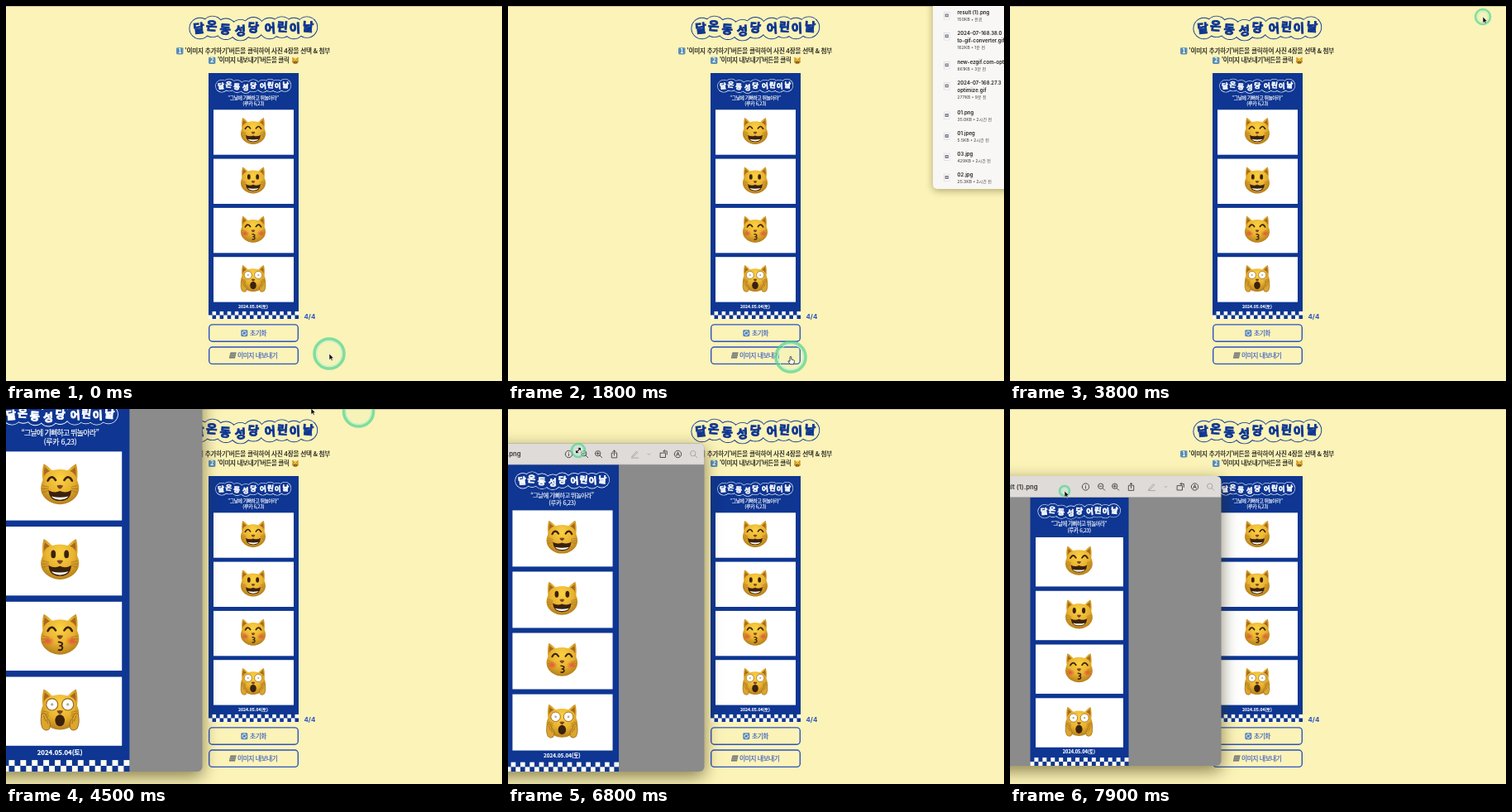
These frames come from a looping animation (600x453 px, 8000 ms). An HTML page:

```html
<!DOCTYPE html>
<html lang="ko">
<head>
<meta charset="utf-8">
<title>네컷 사진 만들기</title>
<style>
  html, body { margin: 0; width: 100%; height: 100%; overflow: hidden; background: #fbf3b8; }
  svg { display: block; width: 600px; height: 453px; }
  text { font-family: "Noto Sans CJK KR", "Noto Sans CJK", "Noto Sans", sans-serif; white-space: pre; }
  .ui { font-family: Inter, "Noto Sans CJK KR", "Noto Sans CJK", sans-serif; }
  .line { fill: none; stroke-linecap: round; stroke-linejoin: round; }
  #panel { filter: drop-shadow(0 2px 5px rgba(60, 50, 0, .4)); }
  #frame { filter: drop-shadow(0 6px 10px rgba(50, 40, 0, .58)); }
</style>
</head>
<body>
<svg id="stage" viewBox="0 0 600 453" xmlns="http://www.w3.org/2000/svg"></svg>
<script>
const CREAM = '#fbf3b8', NAVY = '#0e3692', BLUE = '#2c52c2';
const LOOP = 8000, STEP = 100;

// y is the visual middle of the line; bold is an extra outline in the text colour
const text = (x, y, s, size, o = {}) =>
  `<text x="${x}" y="${y + size * .36}" font-size="${size}" font-weight="${o.w || 500}"
    fill="${o.fill || '#111'}" stroke="${o.fill || '#111'}" stroke-width="${o.bold || 0}"
    text-anchor="${o.a || 'start'}" letter-spacing="${o.ls || 0}" class="${o.c || ''}">${s}</text>`;
const rect = (x, y, w, h, fill, more = '') =>
  `<rect x="${x}" y="${y}" width="${w}" height="${h}" fill="${fill}" ${more}/>`;
const line = (d, color, width = 1) =>
  `<path class="line" d="${d}" stroke="${color}" stroke-width="${width}"/>`;
const at = (x, y, s, inner) => `<g transform="translate(${x} ${y}) scale(${s})">${inner}</g>`;
const mirror = s => s + `<g transform="scale(-1 1)">${s}</g>`;

// Scalloped badge title, centred on 0,0
function logo(fill, ink) {
  const letters = [...'달온동성당어린이날'];
  const xs = [-66, -50.5, -34, -16, 0, 20, 35, 50, 66];
  const ys = [0, -3, 1, 3, -1, 0, -2, 0, -2];
  const turn = [-5, 4, 3, -3, 4, -4, 5, -3, 5];
  const disc = (r, color) => xs.map((x, i) =>
    `<circle cx="${x * .98}" cy="${ys[i] * .7}" r="${r}" fill="${color}"/>`).join('');
  return disc(13.2, ink) + disc(12.3, fill) + letters.map((c, i) =>
    `<g transform="translate(${xs[i]} ${ys[i]}) rotate(${turn[i]})">
      ${text(0, 0, c, 14.5, { w: 900, fill: ink, a: 'middle', bold: .9 })}</g>`).join('');
}

// Cat faces, about 31 units wide
const HEAD = 'M-12.8-16C-10.5-15-8-12.5-6.2-10.8Q0-12.8 6.2-10.8C8-12.5 10.5-15 12.8-16' +
  'C14-12 14.2-8 13.6-3C15.4 1 15.6 4.5 14 8C11 13.5 5 16 0 16' +
  'C-5 16-11 13.5-14 8C-15.6 4.5-15.4 1-13.6-3C-14.2-8-14-12-12.8-16Z';
const BROWN = '#3a210c';
const GRIN = `<path d="M-9 4.8Q-4.5 7.4 0 5.4Q4.5 7.4 9 4.8Q8.4 13.2 0 13.2Q-8.4 13.2-9 4.8Z" fill="${BROWN}"/>
  <path d="M-6.8 9.6Q0 11.2 6.8 9.6Q4.6 12.2 0 12.3Q-4.6 12.2-6.8 9.6Z" fill="#fff"/>`;
const ARCH = mirror(line('M3.4-3.2Q6.6-8.2 9.6-2.8', BROWN, 1.7));
const FACES = [
  ARCH + GRIN,
  mirror(`<ellipse cx="5.2" cy="-4" rx="1.9" ry="3.2" fill="${BROWN}"/>`) + GRIN,
  mirror(`<ellipse cx="9.4" cy="5.2" rx="5" ry="3.8" fill="url(#blush)"/>`) + ARCH +
    line('M-1 6Q3 6.4 1.6 8.3Q.6 9 0 9Q3 9.4 1.6 11.8Q.6 12.6-1 12.2', BROWN, 1.3),
  mirror(`<circle cx="6.2" cy="-4" r="4.6" fill="#fff" stroke="#94631c" stroke-width=".7"/>
    <circle cx="6.2" cy="-4" r="1.1" fill="#b9a98c"/>`) +
    `<ellipse cx="0" cy="8.6" rx="3.8" ry="4.6" fill="${BROWN}"/>` +
    mirror(`<path d="M14.6 4C12.6 1.5 11 4 10 7C8 9 7 12 8.5 15.5Q11 17.4 13.6 15Q15.8 11 14.6 4Z"
      fill="#dca52c" stroke="#94631c" stroke-width=".6"/>` + line('M12.8 5L11.4 9M10.4 8L9.6 11', '#a06c1a', .6))
];
const cat = i => `<path d="${HEAD}" fill="url(#fur)"/>` +
  mirror(`<path d="M12-13.4L8-10.4Q11.5-9 12.6-6Q13-10 12-13.4Z" fill="#a8691c"/>`) +
  mirror(line('M9 2.2L13.6 1.2M9.2 3.6H14M9 5L13.4 6.2', '#94631c', .4)) +
  FACES[i] +
  `<path d="M-2.4 1Q0 .2 2.4 1Q1.7 3.4 0 3.7Q-1.7 3.4-2.4 1Z" fill="#7d4526"/>`;

// Photo strip, 109 x 297
function strip() {
  const cell = 109 / 24;
  let s = rect(0, 0, 109, 297, NAVY) + at(54.2, 15.7, .59, logo(NAVY, '#fff')) +
    text(54, 29.8, '“그날에 기뻐하고 뛰놀아라”', 5.9, { fill: '#fff', a: 'middle', ls: -.5, bold: .12 }) +
    text(54.2, 37, '(루카 6,23)', 5.9, { fill: '#fff', a: 'middle', ls: -.2, bold: .12 });
  for (let i = 0; i < 4; i++) {
    const y = 44.3 + i * 59.3;
    s += rect(6, y, 97, 54.4, '#fff') + at(54, y + 25.8, 1, cat(i));
  }
  s += text(54, 281.8, '2024.05.04(토)', 5.1, { w: 700, fill: '#fff', a: 'middle', bold: .12 });
  for (let i = 0; i < 24; i++)
    s += rect(i * cell, 297 - cell * (i % 2 ? 2 : 1), cell, cell, '#fffef0');
  return s;
}

const keycap = (x, y, n) => rect(x, y - 4, 8.4, 8.2, '#5b8fb4', 'rx="1.4"') +
  text(x + 4.2, y, n, 7, { w: 700, fill: '#fff', a: 'middle' });
const button = (y, x, label) =>
  rect(245.7, y, 107.6, 20.4, CREAM, `rx="4" stroke="${BLUE}" stroke-width="1.4"`) +
  text(x, y + 10.2, label, 7.8, { fill: BLUE, ls: -.5, bold: .1 });

function page() {
  return rect(0, 0, 600, 453, CREAM) + rect(0, 0, 600, 1, '#cfc79c') +
    at(299.3, 27, 1, logo(CREAM, NAVY)) +
    keycap(206, 54.2, 1) +
    text(216.5, 54, "'이미지 추가하기'버튼을 클릭하여 사진 4장을 선택 &amp; 첨부", 7.6, { ls: -.2, bold: .18 }) +
    keycap(245, 65.8, 2) +
    text(256, 65.6, "'이미지 내보내기'버튼을 클릭", 7.6, { ls: -.36, bold: .18 }) +
    at(350, 65.8, .26, cat(0)) +
    '<use href="#strip" x="245" y="81"/>' +
    text(360.5, 375, '4/4', 7.9, { w: 700, fill: BLUE, c: 'ui' }) +
    button(384.9, 295, '초기화') + button(412, 280, '이미지 내보내기') +
    rect(284.3, 391.2, 8, 8, '#5b87b8', 'rx="1.4"') +
    line('M286 395.2A2.3 2.3 0 0 1 290 393.6M290.6 395.2A2.3 2.3 0 0 1 286.6 396.8', '#fff', 1) +
    `<path d="M271.5 418.4H278.6L277 425.6H269.8Z" fill="#5d6268"/>` +
    line('M271.8 420.2H277.6M271.2 422H277.2M270.8 423.8H276.8', '#d9d4b0', .7);
}

// Download list: first line's middle, name lines, details
const FILES = [
  [8, ['result (1).png'], '150KB • 완료'],
  [33, ['2024-07-168.38.0', 'to-gif-converter.gif'], '162KB • 1분 전'],
  [68, ['new-ezgif.com-optimize'], '861KB • 3분 전'],
  [93, ['2024-07-168.27.3', 'optimize.gif'], '277KB • 9분 전'],
  [128.6, ['01.png'], '35.0KB • 2시간 전'],
  [153.6, ['01.jpeg'], '5.5KB • 2시간 전'],
  [178.6, ['03.jpg'], '429KB • 2시간 전'],
  [203.6, ['02.jpg'], '25.3KB • 2시간 전']
];
const panel = () => rect(514, -20, 120, 241, '#f8f7f5', 'rx="5"') + FILES.map(([y, names, info]) =>
  rect(527.5, y - .5, 6.5, 8.5, '#fff', 'stroke="#c8c8c8" stroke-width=".5"') +
  rect(528.7, y + 1.4, 4.1, 4, '#6d7488') + `<circle cx="530.8" cy="${y + 3.4}" r="1.1" fill="#d9d3c4"/>` +
  names.map((n, i) => text(543.5, y + i * 9, n, 6.1, { w: 600, fill: '#222', c: 'ui' })).join('') +
  text(543.5, y + names.length * 9 - .4, info, 5.1, { fill: '#555', c: 'ui' })).join('');

// Toolbar parts are placed from the window's right edge
function toolbar() {
  const ink = '#4c4a48', pale = '#a9a6a2';
  const icon = (x, d, color = ink) => at(x, 13, 1, line(d, color, .95));
  const ring = (cx, cy, r) => `M${cx - r} ${cy}a${r} ${r} 0 1 0 ${2 * r} 0a${r} ${r} 0 1 0 ${-2 * r} 0`;
  const lens = ring(-.8, -.8, 3.2) + 'M1.6 1.6L4.2 4.2';
  return text(-222, 13, 'result (1).png', 7.7, { w: 600, fill: '#383634', a: 'end', c: 'ui' }) +
    icon(-164, ring(0, 0, 4.2) + 'M0-.4V2M0-2V-1.9') +
    icon(-145, lens + 'M-2.4-.8H.8') + icon(-128, lens + 'M-2.4-.8H.8M-.8-2.4V.8') +
    icon(-109, 'M-1.4-1.4H-3.2V4.4H3.2V-1.4H1.4M0 1.5V-4.6M-1.8-2.8L0-4.6L1.8-2.8') +
    icon(-84, 'M-3.2 2.4L2-3.4L3.4-2L-2 3.2L-3.6 3.6ZM-4 4.6H4', pale) +
    icon(-67, 'M-1.4-.6L0 .8L1.4-.6', pale) +
    icon(-49, 'M-4-1.4H2V4H-4ZM-.4-3.6H3.8V.4M1-5L-.4-3.6L1-2.2') +
    icon(-32, ring(0, 0, 4.2) + 'M-1.8 2L0-2.6L1.8 2M-1 .4H1') +
    icon(-13, lens, pale);
}

const GRIP = 'M-2.2 2.6L2.2-2.6M.2-2.8L2.4-2.8L2.4-.6M-2.4 .6V2.8H-.2';
const stage = document.getElementById('stage');
stage.innerHTML = `<defs>
  <radialGradient id="fur" cx=".5" cy=".36" r=".66">
    <stop offset="0" stop-color="#fbd244"/><stop offset=".55" stop-color="#e9b330"/>
    <stop offset="1" stop-color="#b47c1a"/></radialGradient>
  <radialGradient id="blush"><stop offset="0" stop-color="#e8553c"/>
    <stop offset="1" stop-color="#e8553c" stop-opacity="0"/></radialGradient>
  <g id="strip">${strip()}</g>
  <clipPath id="shape"><rect id="cut" x="-343" y="0" width="343" rx="6"/></clipPath></defs>
  ${page()}
  <g id="panel">${panel()}</g>
  <g id="win">
    <g id="frame"><rect id="back" x="-343" width="343" rx="6" fill="#8b8b8b"/></g>
    <g clip-path="url(#shape)">
      <use id="shot" href="#strip"/>
      ${rect(-343, 0, 343, 25.6, '#dedbd8')}${rect(-343, 25.3, 343, .5, '#aaa7a4')}${toolbar()}
    </g>
  </g>
  <g id="halo">
    <circle id="ring" fill="#b8f0c0" fill-opacity=".08" stroke="#4fd592" stroke-opacity=".7"/>
    <circle id="rim" fill="none" stroke="#b5f2cd" stroke-width="1"/>
  </g>
  <g id="arrow"><path d="M0 0V7.6L1.8 6L3 8.6L4.2 8L3.1 5.5H5.4Z" fill="#111" stroke="#fff" stroke-width=".5"/></g>
  <g id="hand"><path d="M-1 0Q0-1.2 .9 0V3L3.6 3.7Q4.6 4 4.4 5.4L3.6 8.8H-.6L-3 5.6Q-3.2 4.4-2 4.7L-1 5.4Z"
    fill="#fff" stroke="#222" stroke-width=".8"/></g>
  <g id="grip">${line(GRIP, '#fff', 2)}${line(GRIP, '#111', 1.1)}</g>`;

const $ = id => document.getElementById(id);
const set = (id, o) => { for (const k in o) $(id).setAttribute(k, o[k]); };
const show = (id, on) => set(id, { visibility: on ? 'visible' : 'hidden' });
const move = (id, x, y) => set(id, { transform: `translate(${x} ${y})` });

// Rows are [time, value, ...]
function track(rows, t) {
  let i = 0;
  while (i < rows.length - 1 && rows[i + 1][0] <= t) i++;
  const a = rows[i], b = rows[i + 1];
  if (!b || t <= a[0]) return a.slice(1);
  const p = (t - a[0]) / (b[0] - a[0]);
  return a.slice(1).map((v, k) => v + (b[k + 1] - v) * p);
}

const POINTER = [[0, 391, 420], [200, 391, 420], [500, 368, 426], [800, 342, 424], [1900, 342, 424],
  [2300, 430, 250], [2700, 535, 66], [3100, 572, 13], [3900, 572, 13], [4500, 369, -1],
  [4600, 350, -60], [6300, 85, -40], [6800, 85, 50], [7200, 48, 106], [7300, 48, 106], [7900, 66, 99]];
const RADIUS = [[0, 18], [1100, 18], [1200, 9], [1300, 9], [1400, 18], [3500, 18], [3600, 9],
  [3800, 9], [4000, 18], [6200, 18], [6300, 8], [7200, 8], [7900, 6]];
// right, top, bottom
const WINDOW = [[0, 237.5, -42, 438], [6300, 237.5, -42, 438], [6800, 237.5, 41.5, 438],
  [7200, 237.5, 88, 438], [7300, 237.5, 88, 438], [7900, 255.5, 81, 431]];

function draw(t) {
  show('panel', t >= 1500 && t < 3600);
  show('win', t >= 4100);

  const [right, top, bottom] = track(WINDOW, t);
  const height = bottom - top, scale = (height - 25.6) / 297;
  move('win', right, top);
  set('back', { height });
  set('cut', { height });
  set('shot', { transform: `translate(${-171.5 - 54.5 * scale} 25.6) scale(${scale})` });

  const [x, y] = track(POINTER, t);
  const resizing = t >= 6300 && t < 7250, over = t >= 700 && t < 2000;
  show('arrow', !resizing && !over);
  show('hand', over);
  show('grip', resizing);
  for (const id of ['arrow', 'hand', 'grip']) move(id, x, y);

  // The halo trails the pointer until the window is grabbed
  const [hx, hy] = track(POINTER, t < 5000 ? Math.max(0, t - 170) : t);
  const [r] = track(RADIUS, t);
  move('halo', hx, hy);
  set('ring', { r, 'stroke-width': r > 12 ? 3.6 : 2.6 });
  set('rim', { r: Math.max(1, r - 2.6) });
}

const start = performance.now();
function tick() {
  const t = (performance.now() - start) % LOOP;
  draw(Math.floor(t / STEP) * STEP);
  requestAnimationFrame(tick);
}
tick();
</script>
</body>
</html>
```
